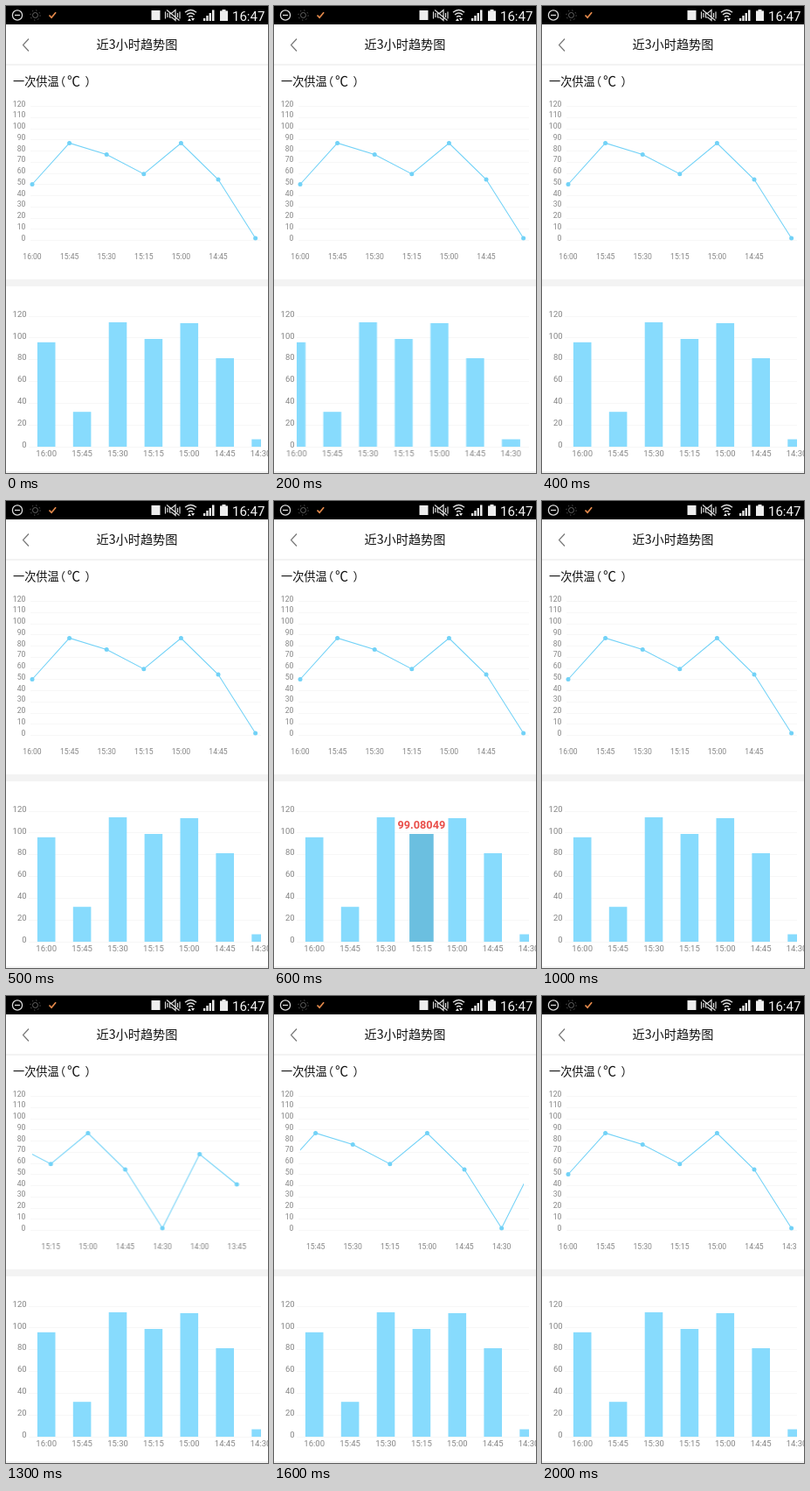
Write an HTML page that moves like this. It is 300 by 533 pixels and loops after 2400 ms.

```html
<!DOCTYPE html>
<html lang="zh">
<head>
<meta charset="utf-8">
<title>近3小时趋势图</title>
<style>
html, body { margin: 0; width: 100%; height: 100%; overflow: hidden; background: #fff; }
svg { display: block; width: 300px; height: 533px; font-family: Roboto, "Noto Sans CJK SC", "Noto Sans CJK", sans-serif; }
.cjk { font-family: "Noto Sans CJK SC", "Noto Sans CJK", sans-serif; font-weight: 500; fill: #111; }
.axis { fill: #858585; }
.small { font-size: 8.6px; }
.large { font-size: 9.5px; }
.mid { text-anchor: middle; }
.end { text-anchor: end; }
.grid { stroke: #f7f7f7; }
.trend { fill: none; stroke: #72d2f7; stroke-width: 1.1; }
.dot { fill: #72d2f7; }
.bar { fill: #87dbfd; }
.picked { fill: #6bbfe0; }
.value { font-size: 12.7px; font-weight: 700; fill: #e9504b; }
.bars, .line, .pick, .late { animation: 2400ms step-end infinite; }
.bars { animation-name: bars; }
.line { animation-name: line; }
.pick { animation-name: pick; }
.late { animation-name: late; }
@keyframes bars {
  0% { transform: none; }
  8.3333% { transform: translateX(-20.4px); }
  16.6667%, 100% { transform: none; }
}
@keyframes line {
  0% { transform: none; }
  54.1667% { transform: translateX(-106.5px); }
  62.5% { transform: translateX(-70px); }
  66.6667% { transform: translateX(-25px); }
  70.8333%, 100% { transform: none; }
}
@keyframes pick {
  0% { opacity: 0; }
  25% { opacity: 1; }
  29.1667%, 100% { opacity: 0; }
}
@keyframes late {
  0% { opacity: 0; }
  54.1667%, 100% { opacity: 1; }
}
</style>
</head>
<body>
<svg viewBox="0 0 300 533">
  <defs>
    <clipPath id="lineClip"><rect x="30" y="100" width="256" height="175"/></clipPath>
    <clipPath id="dotClip"><rect x="27" y="100" width="262" height="175"/></clipPath>
    <clipPath id="timeClip"><rect x="19.5" y="278" width="272.5" height="16"/></clipPath>
    <clipPath id="barClip"><rect x="26" y="340" width="266" height="163"/></clipPath>
  </defs>
  <rect width="300" height="533" fill="#fff"/>

  <!-- status bar -->
  <rect width="300" height="21" fill="#000"/>
  <g fill="none" stroke="#ddd" stroke-width="1.3">
    <circle cx="13" cy="10.5" r="5.6"/>
    <path d="M10 10.5h6"/>
    <g stroke="#666" stroke-width="1">
      <circle cx="33.5" cy="10.5" r="3"/>
      <circle cx="33.5" cy="10.5" r="5.6" stroke-dasharray="1.3 3.1"/>
    </g>
    <path d="M49.5 10.5l2.6 2.8 5-6" stroke="#e58a4c" stroke-width="1.7"/>
    <path d="M187.5 8h2.5l4-3.500v12l-4-3.500h-2.500zM185 8v5M182.500 6.500v8M196.500 8v5M199 6.500v8M184 4.500l14.500 12" stroke-width="1.2"/>
    <path d="M205 7.300q6.500-5.600 13 0M207 10q4.500-4 9 0M209 12.500q2.500-2 5 0"/>
  </g>
  <g fill="#eee">
    <rect x="166.500" y="5" width="10" height="11"/>
    <path d="M208 17l2-3 2 3zM212 14h4l-2 3z"/>
    <path d="M226 17v-3h2.300v3zM229.300 17v-6h2.300v6zM232.600 17V8h2.300v9zM236 17V4.500h2.500V17z"/>
    <path d="M245 5.500h2.500V4h4v1.500h2.500V17h-9z"/>
  </g>
  <text x="259" y="16.500" font-size="15" fill="#f4f4f4">16:47</text>

  <!-- title bar -->
  <path d="M26 37.500l-6.500 7 6.500 7" fill="none" stroke="#777" stroke-width="1.2"/>
  <text class="cjk mid" x="150" y="49" font-size="14.200">近3小时趋势图</text>
  <rect y="66" width="300" height="2" fill="#f3f3f3"/>
  <g class="cjk" font-size="13.200">
    <text x="8" y="90.500">一次供温</text>
    <text x="55" y="90.500">（</text><text x="70" y="91" font-size="15">℃</text><text x="90.500" y="90.500">）</text>
  </g>

  <g id="trendAxis"></g>
  <g clip-path="url(#lineClip)"><g class="line" id="trend"></g></g>
  <g clip-path="url(#dotClip)"><g class="line" id="dots"></g></g>
  <g clip-path="url(#timeClip)"><g class="line" id="trendTimes"></g></g>

  <rect y="312" width="300" height="8" fill="#f3f3f3"/>
  <g id="barAxis"></g>
  <g clip-path="url(#barClip)"><g class="bars" id="bars"></g></g>
  <g class="bars" id="barTimes"></g>
  <g class="pick" id="pick"></g>
  <rect y="531" width="300" height="2" fill="#f3f3f3"/>
</svg>
<script>
const times = ['16:00', '15:45', '15:30', '15:15', '15:00', '14:45', '14:30', '14:00', '13:45'];
const trendY = [203.5, 156.5, 169.5, 191.7, 156.5, 198, 265, 180.5, 215];
const barTop = [383.8, 463.2, 361, 380, 362, 402, 494.5];
const barBase = 503, barWidth = 20.6, pickedWidth = 27.6;
const trendX = i => 30 + i * 42.6;
const barX = i => 46.2 + i * 40.9;

function add(id, tag, attrs, text = '') {
  const el = document.createElementNS('http://www.w3.org/2000/svg', tag);
  for (const key in attrs) el.setAttribute(key, attrs[key]);
  el.textContent = text;
  document.getElementById(id).append(el);
}

function addAxis(id, { step, base, scale, left, right, size, drop }) {
  for (let v = 0; v <= 120; v += step) {
    const y = base - v * scale;
    add(id, 'path', { class: 'grid', d: `M${left} ${Math.floor(y) + 0.5}H292` });
    add(id, 'text', { class: `axis end ${size}`, x: right, y: y + drop }, v);
  }
}

function addBar(id, i, width, style) {
  add(id, 'rect', { class: style, x: barX(i) - width / 2, y: barTop[i], width, height: barBase - barTop[i] });
}

addAxis('trendAxis', { step: 10, base: 267.5, scale: 1.275, left: 28, right: 22.3, size: 'small', drop: 0.2 });
addAxis('barAxis', { step: 20, base: barBase, scale: 1.2415, left: 26, right: 23.6, size: 'large', drop: 0.7 });

add('trend', 'polyline', { class: 'trend', points: trendY.map((y, i) => `${trendX(i)},${y}`).join(' ') });
trendY.forEach((y, i) => {
  add('dots', 'circle', { class: 'dot', cx: trendX(i), cy: y, r: 2.5 });
  const late = i === 6 ? ' late' : '';
  add('trendTimes', 'text', { class: 'axis small mid' + late, x: trendX(i), y: 289 }, times[i]);
});

barTop.forEach((_, i) => {
  addBar('bars', i, barWidth, 'bar');
  add('barTimes', 'text', { class: 'axis large mid', x: barX(i), y: 514 }, times[i]);
});

addBar('pick', 3, pickedWidth, 'picked');
add('pick', 'text', { class: 'value mid', x: barX(3), y: 373.5 }, '99.08049');
</script>
</body>
</html>
```
